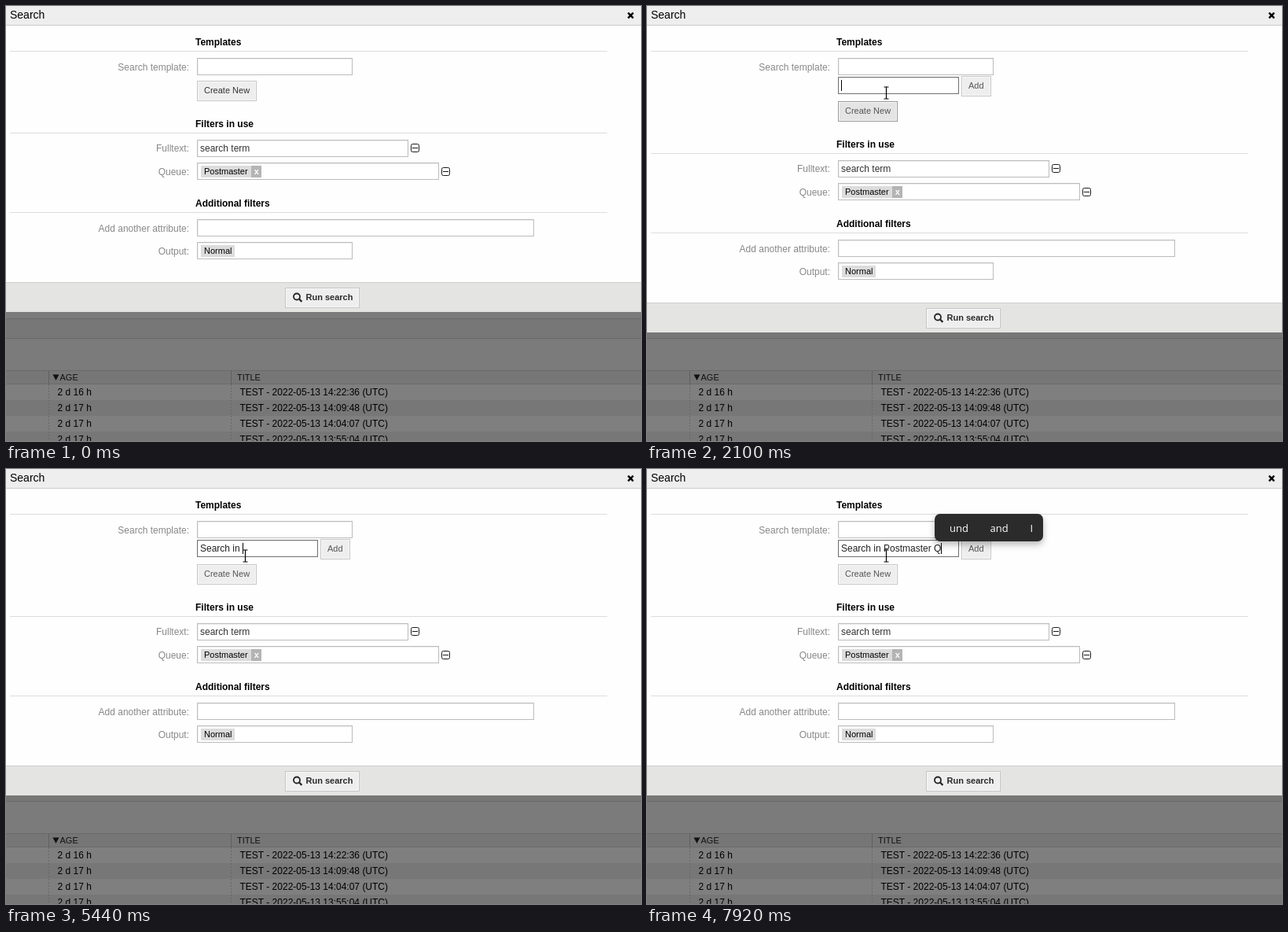
These frames come from a looping animation (808x553 px, 8000 ms). An HTML page:

```html
<!DOCTYPE html>
<html lang="en">
<head>
<meta charset="utf-8">
<title>Search dialog</title>
<style>
  html, body { margin: 0; width: 100%; height: 100%; overflow: hidden; background: #fff; }
  svg { display: block; width: 808px; height: 553px; font: 12px "Liberation Sans", Arial, sans-serif; }
  text { white-space: pre; }
  .small { font-size: 11px; }
  .bold { font-weight: bold; }
  .label { fill: #888; text-anchor: end; }
  .popup { filter: drop-shadow(0 4px 4px rgba(0, 0, 0, .28)); }
  .popup text { font: 13px "Open Sans", "Noto Sans", sans-serif; fill: #fff; }
</style>
</head>
<body>
<svg id="stage" viewBox="0 0 808 553" xmlns="http://www.w3.org/2000/svg"></svg>
<script>
const LOOP = 8000, OPEN_AT = 2100, SHIFT = 26;
const stage = document.getElementById('stage');

function el(parent, tag, attrs = {}, content) {
  const node = document.createElementNS('http://www.w3.org/2000/svg', tag);
  for (const key in attrs) node.setAttribute(key, attrs[key]);
  if (content !== undefined) node.textContent = content;
  parent.appendChild(node);
  return node;
}
const group = (parent, attrs) => el(parent, 'g', attrs);
const rect = (parent, x, y, width, height, fill) => el(parent, 'rect', { x, y, width, height, fill });
const text = (parent, x, y, content, cls = '', fill = '#000') =>
  el(parent, 'text', { x, y, class: cls, fill }, content);
const line = (parent, d, stroke, width = 1) =>
  el(parent, 'path', { d, stroke, 'stroke-width': width, fill: 'none' });
const show = (node, on) => node.setAttribute('visibility', on ? 'visible' : 'hidden');
const move = (node, x, y) => node.setAttribute('transform', `translate(${x} ${y})`);

const fields = [];
function field(parent, x, y, width, border = '#bcbcbc') {
  fields.push({ x, y, width });
  rect(parent, x, y, width, 22, border);
  rect(parent, x + 1, y + 1, width - 2, 20, '#fff');
  rect(parent, x + 1, y + 1, width - 2, 1, '#ededed');
  rect(parent, x + 1, y + 1, 1, 20, '#f1f1f1');
}

function button(parent, x, y, width) {
  const border = rect(parent, x, y, width, 26, '#c6c6c6');
  rect(parent, x + 1, y + 1, width - 2, 24, '#f8f8f8');
  const face = rect(parent, x + 2, y + 2, width - 4, 22, '#eeeeee');
  return { border, face };
}

function section(parent, y, title) {
  text(parent, 241, y, title, 'bold');
  rect(parent, 5, y + 7, 760, 1, '#dcdcdc');
}

function chip(parent, y, width, label) {
  rect(parent, 248, y, width, 15, '#dcdcdc');
  text(parent, 252, y + 11, label, 'small');
}

function minusBox(parent, x, y) {
  el(parent, 'rect', { x: x + .5, y: y + .5, width: 10, height: 10, rx: 2, fill: 'none', stroke: '#1a1a1a' });
  rect(parent, x + 2, y + 5, 7, 1, '#1a1a1a');
}

function buildTable() {
  rect(stage, 0, 0, 808, 553, '#7b7b7b');
  rect(stage, 0, 397, 808, 26, '#777');
  for (const y of [397, 422, 463]) rect(stage, 0, y, 808, 1, '#696969');
  rect(stage, 0, 464, 808, 17, '#767676');
  rect(stage, 0, 480, 808, 1, '#6a6a6a');
  ['16 h|14:22:36', '17 h|14:09:48', '17 h|14:04:07', '17 h|13:55:04'].forEach((row, i) => {
    const [age, clock] = row.split('|'), y = 481 + 20 * i;
    rect(stage, 0, y, 808, 20, i % 2 ? '#777' : '#7f7f7f');
    text(stage, 65.5, y + 14, '2 d ' + age);
    text(stage, 297.5, y + 14, `TEST - 2022-05-13 ${clock} (UTC)`);
  });
  for (const x of [54, 286]) {
    rect(stage, x, 464, 1, 17, '#606060');
    line(stage, `M${x + .5} 481V553`, '#666670').setAttribute('stroke-dasharray', '2 2');
  }
  el(stage, 'path', { d: 'M59.5 468.5h8l-4 7.5z', fill: '#111' });
  text(stage, 68.5, 476, 'AGE', 'small', '#111');
  text(stage, 294, 476, 'TITLE', 'small', '#111');
}

function buildHeader() {
  rect(stage, 0, 0, 808, 24, '#eee');
  rect(stage, 0, 24, 808, 1, '#cbcbcb');
  text(stage, 5, 16, 'Search').setAttribute('style', 'font-size:14px');
  line(stage, 'M791.5 8.7l6.6 6.6m0-6.6l-6.6 6.6', '#000', 2.4);
  section(stage, 50, 'Templates');
  text(stage, 233, 82, 'Search template:', 'label');
  field(stage, 243, 66, 198);
}

buildTable();
rect(stage, 0, 25, 808, 326, '#fefefe');
const lower = group(stage);
rect(lower, 0, 90, 808, 261, '#fefefe');
const create = button(lower, 243, 95, 76);
const createLabel = text(lower, 252, 111, 'Create New', 'small', '#333');
section(lower, 154, 'Filters in use');
section(lower, 255, 'Additional filters');
for (const [y, label] of [[185, 'Fulltext:'], [215, 'Queue:'], [287, 'Add another attribute:'], [316, 'Output:']])
  text(lower, 233, y, label, 'label');
field(lower, 243, 170, 269);
field(lower, 243, 199, 308);
field(lower, 243, 271, 429);
field(lower, 243, 300, 198);
text(lower, 247, 185, 'search term', '', '#333');
chip(lower, 203, 64, 'Postmaster');
rect(lower, 312, 203, 13, 15, '#b4b4b4');
text(lower, 315.7, 214, 'x', 'small bold', '#fff');
chip(lower, 304, 43, 'Normal');
minusBox(lower, 515, 175);
minusBox(lower, 554, 205);
rect(lower, 0, 351, 808, 38, '#e4e4e3');
rect(lower, 0, 351, 808, 1, '#cdcdcd');
button(lower, 355, 358, 95);
el(lower, 'circle', { cx: 370, cy: 369.5, r: 4, fill: 'none', stroke: '#222', 'stroke-width': 1.8 });
line(lower, 'M373 372.5l3.4 3.4', '#222', 2.2);
text(lower, 381.5, 374, 'Run search', 'small bold', '#2a2a2a');
buildHeader();

// Row that opens for naming the new template
const entry = group(stage);
field(entry, 243, 90, 154, '#707070');
fields.pop();
button(entry, 400, 89, 38);
text(entry, 409, 105, 'Add', 'small', '#555');
const typed = text(entry, 247, 105, '', '', '#222');
const caret = rect(entry, 247, 94, 1, 14, '#000');

const measurer = document.createElement('canvas').getContext('2d');
const widthOf = (string, font) => { measurer.font = font; return measurer.measureText(string).width; };

const typing = [
  [2100, ''], [3900, 'S'], [4030, 'Se'], [4240, 'Sea'], [4380, 'Sear'], [4450, 'Searc'],
  [4710, 'Search '], [4780, 'Search in'], [5440, 'Search in '], [5640, 'Search '],
  [5710, 'Search i'], [5840, 'Search in'], [5900, 'Search in '], [6100, 'Search in P'],
  [6300, 'Search in Po'], [6370, 'Search in Pos'], [6500, 'Search in Post'],
  [6900, 'Search in Postm'], [6970, 'Search in Postma'], [7120, 'Search in Postmas'],
  [7190, 'Search in Postmast'], [7320, 'Search in Postmaste'], [7390, 'Search in Postmaster'],
  [7590, 'Search in Postmaster '], [7920, 'Search in Postmaster Q']
];

const popups = [
  [4180, 4310, 263, 438, 'See Set Search'],
  [4710, 4780, 289, 455, 'for engine the'],
  [4980, 5310, 299, 427, 'in ist is'],
  [6300, 6370, 310, 511, 'Paris Portland Polen'],
  [6700, 7120, 321, 497, 'Post Pos Postal'],
  [7790, LOOP, 366, 504, 'und and I']
].map(([from, to, left, right, words]) => {
  const node = group(stage, { class: 'popup' });
  el(node, 'rect', { x: left, y: 57, width: right - left, height: 35, rx: 7, fill: '#2b2b2b' });
  const list = words.split(' ');
  const widths = list.map(word => widthOf(word, '13px "Open Sans", "Noto Sans", sans-serif'));
  const gap = (right - left - 32 - widths.reduce((a, b) => a + b)) / 2;
  let x = left + 19;
  list.forEach((word, i) => {
    text(node, x, 80, word, '', '#fff');
    x += widths[i] + gap;
  });
  return { node, from, to };
});

const click = el(stage, 'circle', { cx: 302, cy: 109, r: 12, fill: '#ff0', 'fill-opacity': .47 });

const pointer = { arrow: group(stage), hand: group(stage), beam: group(stage) };
const outline = { fill: '#fff', stroke: '#000', 'stroke-linejoin': 'round' };
el(pointer.arrow, 'path', { d: 'M.5 .5v16l3.7-3.5 2.5 5.5 2.3-1-2.4-5.4h5z', ...outline });
el(pointer.hand, 'path', {
  d: 'M-1.5 11V1.5q1.5-2 3 0V7q2-1.5 3 .5 2-1 3 .7 2.500-.8 2.500 1.500v5l-2 3.300v3H-1v-3l-4.500-6.500q0-2.500 2.500-1z',
  ...outline
});
line(pointer.beam, 'M-3-7.500h2.500l.5.5.5-.5H3M0-7V7M-3 7.500h2.500l.5-.5.5.5H3', '#000', 1.2);

const stepOf = (t, start) => Math.min(6, Math.floor((t - start) / 68 + .05));
const easeOut = p => Math.sin(p * Math.PI / 2);

function pointerAt(t) {
  if (t >= OPEN_AT) return [304.5, 110.5];
  if (t >= 870) {
    const p = (stepOf(t, 870) + 1) / 7;
    return [323 - 21 * p, 40 + 69 * easeOut(p)];
  }
  const p = easeOut(stepOf(t, 260) / 6);
  return [705 - 382 * p, 496 - 456 * p];
}

const within = (x, y, box, height) =>
  x >= box.x && x < box.x + box.width && y >= box.y && y < box.y + height;

function pointerKind(t, x, y) {
  if (t >= OPEN_AT || fields.some(f => within(x, y, f, 22))) return 'beam';
  return within(x, y, { x: 243, y: 95, width: 76 }, 26) ? 'hand' : 'arrow';
}

function render(t) {
  const open = t >= OPEN_AT;
  move(lower, 0, open ? SHIFT : 0);
  entry.setAttribute('display', open ? 'inline' : 'none');

  const current = typing.filter(([at]) => at <= t).pop();
  const string = current ? current[1] : '';
  typed.textContent = string;
  caret.setAttribute('x', Math.floor(247 + widthOf(string, '12px "Liberation Sans", Arial, sans-serif')));
  const blinkOff = (t >= 2640 && t < 3170) || (t >= 3700 && t < 3900);
  caret.setAttribute('opacity', blinkOff ? 0 : 1);
  for (const { node, from, to } of popups) show(node, t >= from && t < to);

  const [x, y] = pointerAt(t).map((v, i) => open ? v : Math.round(v) + (t >= 870 ? .5 * (1 - i) : 0));
  const kind = pointerKind(t, x, y);
  for (const name in pointer) {
    show(pointer[name], t >= 260 && name === kind);
    move(pointer[name], x, y);
  }
  show(click, t >= 1830 && t < OPEN_AT);

  const active = kind === 'hand' || (open && t < 2240);
  const fading = t >= 2240 && t < 2310;
  create.border.setAttribute('fill', active ? '#999' : fading ? '#b0b0b0' : '#c6c6c6');
  create.face.setAttribute('fill', active ? '#e4e4e4' : fading ? '#e9e9e9' : '#eee');
  createLabel.setAttribute('fill', open ? '#555' : '#333');
}

const started = performance.now();
function tick() {
  render((performance.now() - started) % LOOP);
  requestAnimationFrame(tick);
}
render(0);
requestAnimationFrame(tick);
</script>
</body>
</html>
```
